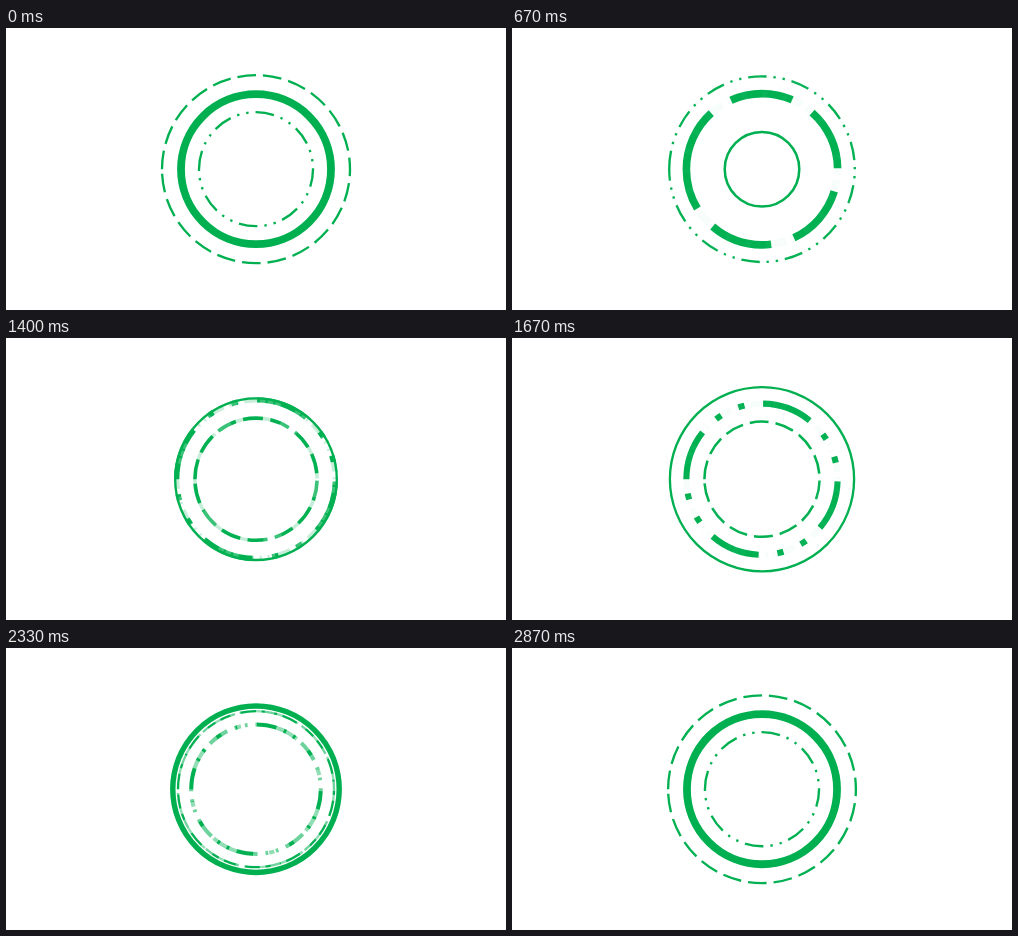
These frames come from a looping animation (500 px wide and 282 px high, 2940 ms). An HTML page:

```html
<!DOCTYPE html>
<html lang="en">
<head>
<meta charset="utf-8">
<title>Morphing rings</title>
<style>
  html, body { margin: 0; width: 100%; height: 100%; overflow: hidden; background: #fff; }
  svg { display: block; width: 500px; height: 282px; }
  circle { fill: none; stroke: #00b050; }
  g { isolation: isolate; }
  .blend { mix-blend-mode: plus-lighter; }
</style>
</head>
<body>
<svg id="stage" viewBox="0 0 500 282"></svg>
<script>
const LOOP = 2940, STEP = 1000 / 15, MORPH = 870;
const STARTS = [0, 1000, 2060];
const THIN = 2.34, THICK = 7.81;
const OUTER = 94, MIDDLE = 75, INNER = 57;

// Each ring cycles through three poses: [radius, line width].
const rings = [
  { dash: null, poses: [[MIDDLE, THICK], [36, THIN], [OUTER, THIN]] },
  { dash: [8, 3], poses: [[OUTER, THIN], [MIDDLE, THICK], [INNER, THIN]] },
  { dash: [8, 3, 1, 3, 1, 3], poses: [[INNER, THIN], [OUTER, THIN], [MIDDLE, 6.25]] }
];

const stage = document.getElementById("stage");
const lerp = (a, b, p) => a + (b - a) * p;

function add(parent, name, attrs) {
  const node = document.createElementNS("http://www.w3.org/2000/svg", name);
  for (const key in attrs) node.setAttribute(key, attrs[key]);
  return parent.appendChild(node);
}

for (const ring of rings) {
  const group = add(stage, "g", { transform: "translate(250 141.2) rotate(180)" });
  ring.from = add(group, "circle", { class: "blend" });
  ring.to = add(group, "circle", { class: "blend" });
}

function bezier(a, b, s) {
  const q = 1 - s;
  return 3 * s * q * q * a + 3 * s * s * q * b + s * s * s;
}

function ease(x) {
  if (x <= 0 || x >= 1) return x <= 0 ? 0 : 1;
  let low = 0, high = 1;
  for (let i = 0; i < 24; i++) {
    const mid = (low + high) / 2;
    if (bezier(0.22, 0.22, mid) < x) low = mid; else high = mid;
  }
  return bezier(0.06, 1, low);
}

// The dash pattern belongs to a pose and scales with the radius.
function paint(node, dash, pose, radius, width, alpha) {
  node.setAttribute("r", radius);
  node.setAttribute("stroke-width", width);
  node.setAttribute("opacity", alpha);
  if (dash) {
    const unit = pose[1] * radius / pose[0];
    node.setAttribute("stroke-dasharray", dash.map(n => n * unit).join(" "));
  }
}

function draw(time) {
  const t = Math.floor((time % LOOP + 5) / STEP) * STEP;
  const phase = t < STARTS[1] ? 0 : t < STARTS[2] ? 1 : 2;
  const p = ease((t - STARTS[phase]) / MORPH);
  for (const { dash, poses, from, to } of rings) {
    const a = poses[phase], b = poses[(phase + 1) % 3];
    const radius = lerp(a[0], b[0], p), width = lerp(a[1], b[1], p);
    paint(from, dash, a, radius, width, dash ? 1 - p : 0);
    paint(to, dash, b, radius, width, dash ? p : 1);
  }
}

const begin = performance.now();
function tick() {
  draw(performance.now() - begin);
  requestAnimationFrame(tick);
}
tick();
</script>
</body>
</html>
```
